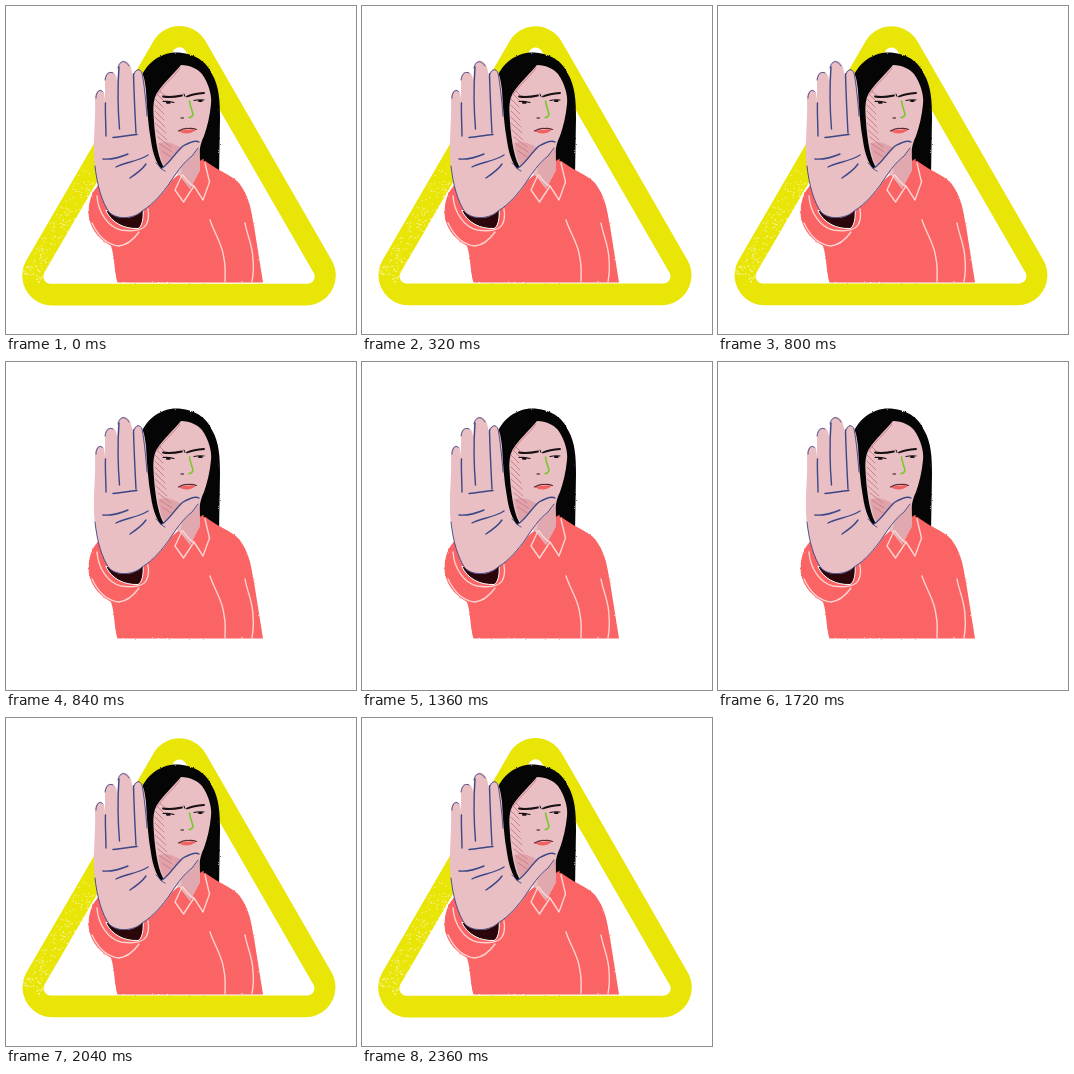
These frames come from a looping animation (350 by 328 pixels, 2400 ms). An HTML page:

```html
<!DOCTYPE html>
<html lang="en">
<head>
<meta charset="utf-8">
<title>Stop sign</title>
<style>
  html, body { margin: 0; width: 100%; height: 100%; overflow: hidden; background: #fff; }
  svg { display: block; width: 100%; height: 100%; }
  path { fill: none; stroke-linecap: round; stroke-linejoin: round; }
  .skin path { fill: #e9bfc4; }
  .cloth { fill: #fb6464; }
  .ink { fill: #050505; }
  .seam path { stroke: #ffd3d0; stroke-width: 1.4; }
  .crease path { stroke: #3c4787; stroke-width: 1.4; }
  .fine path { stroke-width: .9; }
  .hatch path { stroke: #cf7f8a; stroke-width: 1; }
  .brow path { stroke: #171014; }
</style>
</head>
<body>
<svg viewBox="0 0 350 328">
  <defs>
    <filter id="rough" x="-5%" y="-5%" width="110%" height="110%" color-interpolation-filters="sRGB">
      <feTurbulence type="fractalNoise" baseFrequency=".35" numOctaves="2" seed="4"/>
      <feDisplacementMap in="SourceGraphic" scale="2" xChannelSelector="R" yChannelSelector="G"/>
    </filter>
  </defs>

  <g id="sign">
    <g stroke-linejoin="round">
      <polygon points="46.2,269.5 299.8,269.5 173.5,50" fill="#e8e507" stroke="#e8e507" stroke-width="60"/>
      <polygon points="44.5,270.5 301.5,270.5 173.5,48.5" fill="#fff" stroke="#fff" stroke-width="14.5"/>
    </g>
    <path id="grain" stroke="#faf8b8" stroke-width=".9"/>
  </g>

  <g filter="url(#rough)">
    <path class="ink" d="M134 80C133 66 148 48 168 46.500C188 46 201 56 206 68C213 80 214 94 214 112L213 170L192 164L152 168C142 150 136 130 136 112Z"/>
    <path class="cloth" d="M197 153C208 163 226 169 233 177C243 190 245 203 248 220L257 276.500H111.500C108 266 109 252 105 240C91 232 82.500 220 82.500 206C83 193 87 184 93 179L155 183L177 165Z"/>
  </g>
  <path d="M100 205C106 217 118 223 132 222.500C136 221 138 212 137 202Z" stroke="#fff" style="fill:#2b070b"/>

  <g class="skin">
    <path d="M175 59C184 59 192 63 196 68C203 78 206 90 205 98C204 110 201 121 198 130C195 136 194 141 193.500 146L194 164L184 183L174 170L157 160C151 148 148.500 128 147.500 108C147 99 148 92 151 87C158 76 167 69 175 59Z"/>
  </g>
  <path d="M193.500 142L194 164L184 183L175 168L177 150C183 147 189 144 193.500 142Z" style="fill:#dfa9af"/>
  <path d="M158 136C165 136 170 139 176 142L168 152L158 159C154 151 153 143 152 137Z" style="fill:#dfa3a9"/>

  <g class="hatch">
    <path d="M174 62C166 73 157 79 151 89" stroke-width="1.600"/>
    <path d="M154 85l4 4M151 88l7 7M149 93l8 8M149 99l9 9M149 105l9 9M149 111l10 10M149 117l11 10M150 124l11 10M152 131l13 10M154 138l12 8M156 145l9 6"/>
  </g>
  <g class="brow">
    <path d="M157 90.500C163 91.500 169 91 176 89.500M181 90.500C186 88.500 192 87.500 198 87" stroke-width="1.800"/>
    <path d="M178 88l1 2.500" stroke-width="1"/>
    <path d="M157 95.500C161 95 164 95.500 168 96.500M188 94.500C192 93.500 195 93.500 198 94" stroke-width="1.100"/>
    <path d="M161 96.800h2.600M193 95h2.600" stroke-width="2"/>
    <path d="M175 112h2.500" stroke-width="1"/>
  </g>
  <path d="M183.500 95C184 100 186 104 187 108C186.500 110.500 185 111.500 183 111.500" stroke="#76c928" stroke-width="1.600"/>
  <path d="M173 125C178 123.500 184 123.500 190 123.500C186 128 178 129 173 125Z" style="fill:#f4605f"/>
  <path d="M172.500 125C176 123 179 122 182 122.500C185 122 188 122.500 190.500 123.500" stroke="#5b2830" stroke-width="1.200"/>

  <g class="skin">
    <path d="M89 93C89 86 92 83 95 84C98 85 99 90 99 96L99 74C99 68 101 65.500 105 66C109 66 111 70 111 76L112 62C113 56 116 54 119 55C123 56 126 61 126.500 70C128 63 132 62 135 65C138 69 139 76 140 84C141 102 142 119 145 135C147 148 150 156 155 163C163 157 168 150 174 143C180 137 188 134 193 135.500C196 139 191 145 185 151C174 160 168 173 160 183C153 192 143 202 136 205C129 213 112 215 103 206C96 196 91 179 89 162C86 140 90 116 89 93Z"/>
  </g>
  <g class="crease">
    <path d="M99.500 97C99 107 100 119 100 130M113 61C111.500 82 112 105 113.500 123M127.500 68C128 88 129 108 130 127"/>
    <path d="M107 131.500C115 131 123 129 131 128.500M97 153C107 154 115 151 122 148M110 161C119 156 131 156 142 149M124 172C130 168 136 164 140 158"/>
    <path d="M156 162C164 157 168 148 177 140C184 136 190 134 193 136"/>
    <g class="fine">
      <path d="M97 86C94 82 90 86 90 92M99 74C100 67 104 65 107 67M112 62C113 55 119 53 123 60M128 68C130 63 134 62 136 67C138 77 140 96 141 110"/>
      <path d="M89 160C91 179 96 196 103 206C112 215 129 212 136 205C148 198 157 186 163 178C170 167 177 157 186 150L192 142"/>
      <path d="M150 157C153 159 154 163 159 165"/>
    </g>
  </g>

  <g class="seam">
    <path d="M91 190C92 206 102 221 115 224C127 226 137 224 140 219C143 214 143 209 142 203M86 217C93 232 103 239 113 240C121 239 128 233 133 226"/>
    <path d="M176 169L169 184L177.500 196L188 180L197 194L203.500 176L199 157M177 169C181 175 184 179 188 180"/>
    <path d="M204 214C209 229 217 239 218 253C220 262 219 270 219 276M239 217C241 229 247 240 247 254C248 263 247 270 246 276"/>
  </g>
</svg>

<script>
  const LOOP = 2400, HIDE = 840, SHOW = 1760;
  const sign = document.getElementById('sign');

  let seed = 7;
  const random = () => (seed = seed * 16807 % 2147483647) / 2147483647;

  // Worn paint, densest in the lower left corner of the sign.
  let grain = '';
  for (let i = 0; i < 170; i++) {
    const along = random() ** 1.6 * 120 - 12, across = random() * 21;
    const x = 22 + along * .5 + across * .866;
    const y = 256 - along * .866 + across * .5;
    grain += `M${x.toFixed(1)} ${y.toFixed(1)}h.5`;
  }
  document.getElementById('grain').setAttribute('d', grain);

  function draw(now) {
    const t = now % LOOP;
    const visible = t < HIDE || t >= SHOW;
    const inset = .25 - .25 * Math.cos(t / 1200 * 2 * Math.PI);
    sign.setAttribute('visibility', visible ? 'visible' : 'hidden');
    sign.setAttribute('transform', `translate(173 160) scale(${1 - inset / 157}) translate(-173 -160)`);
    requestAnimationFrame(() => draw(performance.now() - start));
  }
  const start = performance.now();
  draw(0);
</script>
</body>
</html>
```
